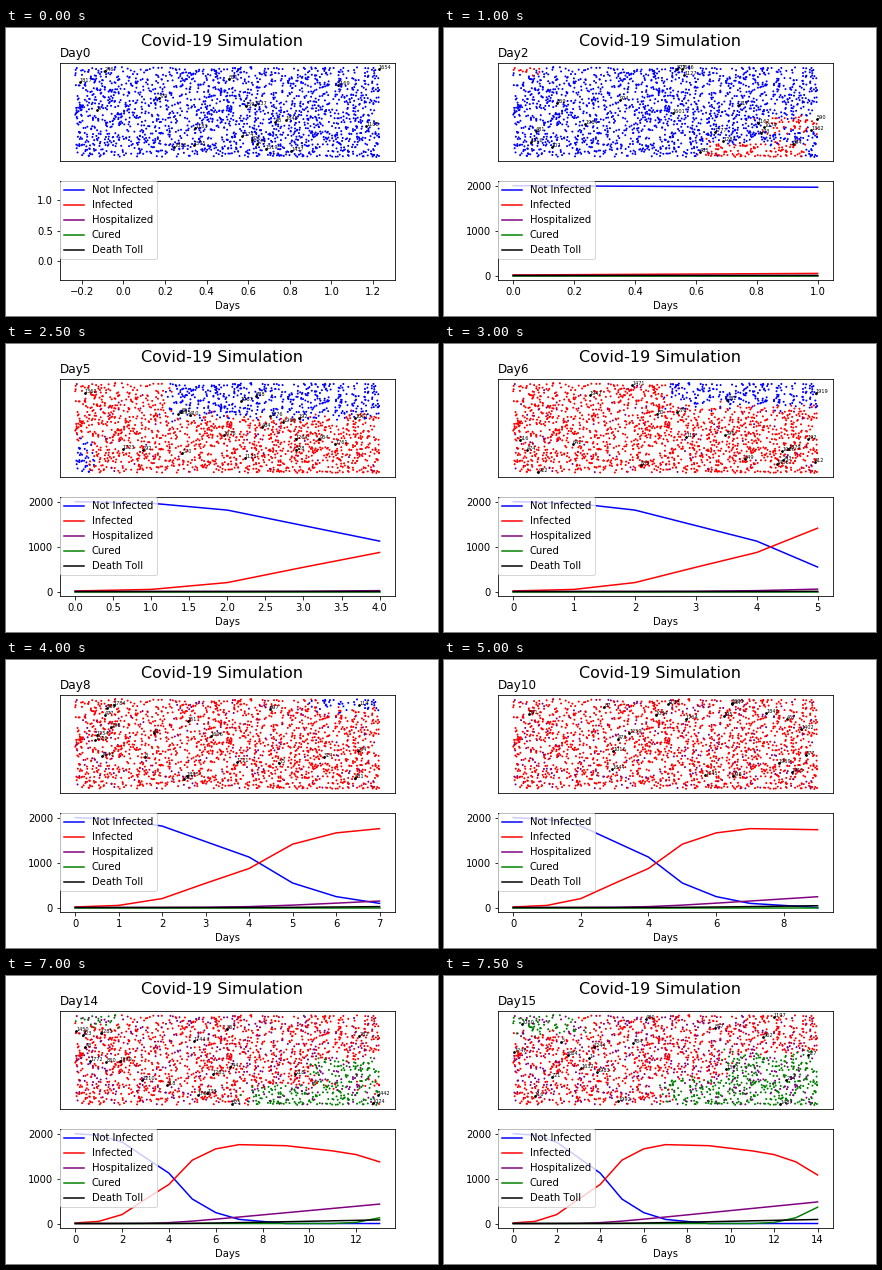
Write a matplotlib script that moves like this. It is 432x288 px and loops after 8 s.

```python
import numpy as np
import matplotlib.pyplot as plt
from matplotlib.animation import FuncAnimation

PEOPLE, DAYS, MOVERS, FIRST_CASES = 2000, 16, 20, 12
plt.rcParams["text.kerning_factor"] = 6
rng = np.random.default_rng(19)


def uninfected(day):
    return np.interp(day, [0, 1, 2, 4, 5, 6, 7, 9],
                     [PEOPLE, 1965, 1812, 1122, 545, 243, 92, 0])


def ramp(day, start, slope):
    """Zero before start, then a straight climb, with a soft corner."""
    return slope * 0.6 * np.log1p(np.exp((day - start) / 0.6))


# Daily totals; recovery follows infection eleven days later
days = np.arange(DAYS)
healthy = uninfected(days)
hospital = ramp(days, 4, 48)
deaths = ramp(days, 5, 10)
cured = 0.68 * (PEOPLE - uninfected(days - 11))
infected = PEOPLE + FIRST_CASES - healthy - hospital - deaths - cured

SERIES = [
    ("Not Infected", "blue", healthy),
    ("Infected", "red", infected),
    ("Hospitalized", "purple", hospital),
    ("Cured", "green", cured),
    ("Death Toll", "black", deaths),
]

# The crowd lives in a unit square, with y pointing up
home = rng.random((PEOPLE, 2))
frailty = rng.random(PEOPLE)


def spread_rank(pos):
    """Order in which people catch the virus: three hot spots, then the top right."""
    x, y = (pos + rng.normal(0, 1, pos.shape) * [0.015, 0.03]).T
    spots = [(0.785, 0.06, 0.165, 0.10), (0.91, 0.365, 0.09, 0.08), (0.0, 1.0, 0.10, 0.07)]
    near = np.min([np.maximum(abs(x - cx) - w, abs(y - cy) - h)
                   for cx, cy, w, h in spots], axis=0)
    late = np.minimum((x - 0.3) / 0.7, (y - 0.62) / 0.38)
    score = np.where(late > 0, np.maximum(near, 2 + late), near)
    in_spot = near <= 0
    score[in_spot] = near[in_spot]
    return score.argsort().argsort()


rank = spread_rank(home)


def colours(day):
    state = np.full(PEOPLE, "blue", dtype="<U6")
    caught = rank < PEOPLE - healthy[day]
    state[caught] = "red"
    state[rank < cured[day]] = "green"
    order = np.argsort(np.where(caught, frailty, 2))
    state[order[:int(hospital[day])]] = "purple"
    return state


fig, (crowd, chart) = plt.subplots(2, 1, figsize=(6, 4), dpi=72)
fig.subplots_adjust(left=0.125, right=0.9, bottom=0.125, top=0.88, hspace=0.2)
fig.suptitle("Covid-19 Simulation", fontsize=16)


def draw_crowd(day):
    crowd.clear()
    crowd.set(xticks=[], yticks=[], xlim=(-0.05, 1.05), ylim=(-0.05, 1.05))
    crowd.set_title(f"Day{day}", loc="left", fontsize=12)
    day_rng = np.random.default_rng(100 + day)
    ids = day_rng.choice(PEOPLE, MOVERS, replace=False)
    spots = day_rng.random((MOVERS, 2))
    stay = np.ones(PEOPLE, bool)
    stay[ids] = False
    crowd.scatter(*home[stay].T, s=1, c=colours(day)[stay])
    crowd.scatter(*spots.T, s=3, c="black")
    for i, spot in zip(ids, spots):
        crowd.annotate(str(i), spot, fontsize=5)


def draw_chart(day):
    chart.clear()
    for label, colour, values in SERIES:
        chart.plot(days[:day], values[:day], color=colour, label=label)
    if day == 0:
        # An empty chart grows from 0..1 by a tenth for each of the series
        half = 0.5 * 1.1 ** len(SERIES)
        chart.set(xlim=(0.5 - half, 0.5 + half), ylim=(0.5 - half, 0.5 + half))
    chart.set_xlabel("Days")
    chart.legend(loc="upper left", borderaxespad=0)


def draw(day):
    draw_crowd(day)
    draw_chart(day)
    return []


anim = FuncAnimation(fig, draw, frames=DAYS, init_func=lambda: [], interval=500,
                     repeat=True, repeat_delay=0)
plt.show()
```
